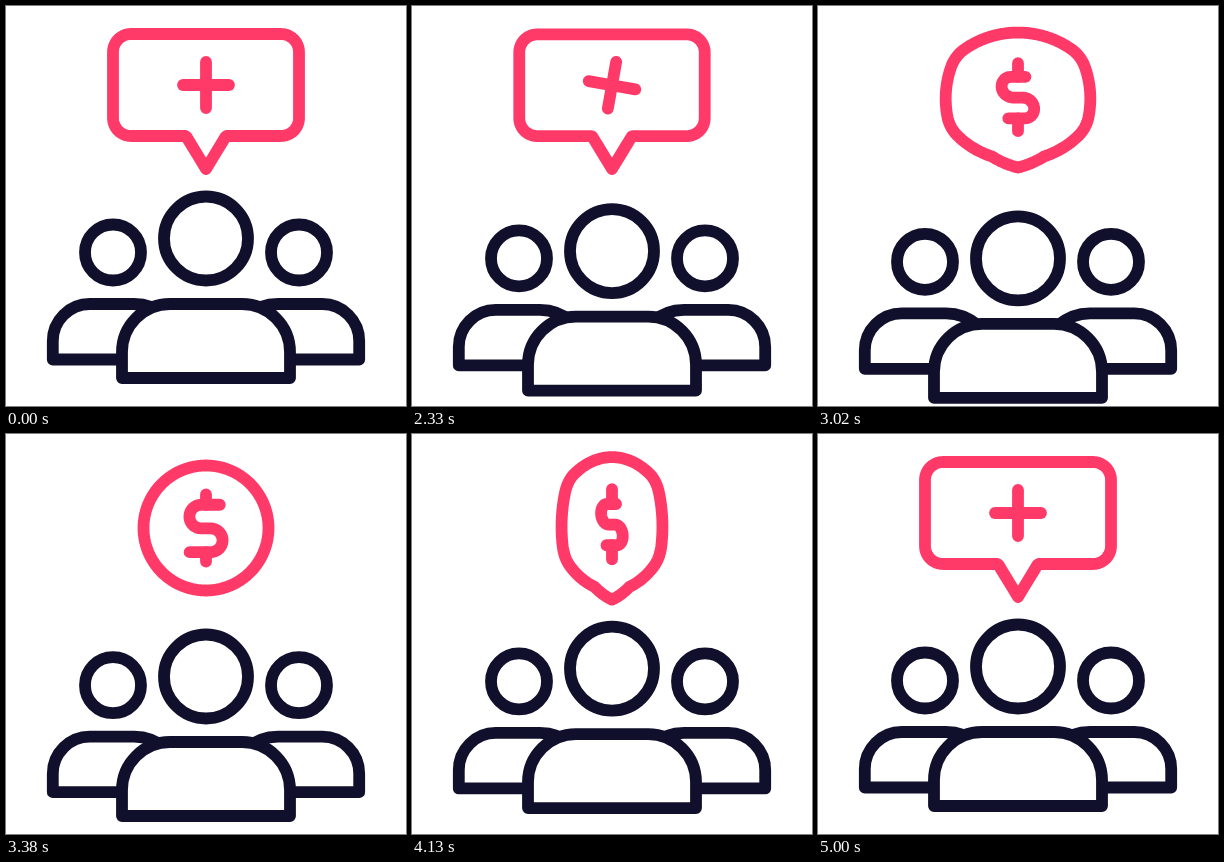
Animation of 400x400 px, one loop 5.03 s. Source, as an HTML page:

```html
<!DOCTYPE html>
<html lang="en">
<head>
<meta charset="utf-8">
<title>Group health costs</title>
<style>
  html, body { margin: 0; width: 100%; height: 100%; overflow: hidden; background: #fff; }
  svg { display: block; width: 100vw; height: 100vh; }
  path, circle { fill: none; stroke-width: 11.8; stroke-linecap: round; stroke-linejoin: round; }
  .people { stroke: #10102c; }
  .people .front { fill: #fff; }
  .icon { stroke: #ff3a69; }
</style>
</head>
<body>
<svg viewBox="0 0 400 400">
  <defs>
    <g id="person">
      <circle cx="107" cy="246.5" r="28"/>
      <path d="M116 353.5H46.8V335A37 37 0 0 1 83.8 298H128Q146 298 160 310"/>
    </g>
  </defs>
  <g class="people">
    <g id="sides">
      <use href="#person"/>
      <use href="#person" transform="translate(400) scale(-1 1)"/>
    </g>
    <g id="middle">
      <circle cx="200" cy="232.5" r="42"/>
      <path class="front" d="M116 372V346A48 48 0 0 1 164 298H236A48 48 0 0 1 284 346V372Z"/>
    </g>
  </g>
  <g class="icon">
    <path id="outline"/>
    <path id="bar"/>
    <path id="stems"/>
  </g>
</svg>
<script>
const LOOP = 5030, HOLD = 2030, STEP = 30;
const TIP = 163, PLUS_Y = 79, COIN_Y = 94;
const $ = id => document.getElementById(id);

// [time, value] keys, joined by smooth curves
const keys = {
  drop: [[2030, 0], [2150, 3], [2340, 13], [2540, 20], [2800, 21], [2950, 20.5], [3110, 18.5],
         [3380, 10], [3650, 6], [3800, 4], [4190, 1.8], [4400, 1], [5000, 0]],
  bubble: [[2000, 1], [2030, .98], [2140, .93], [2540, 1.075], [2750, 1.065], [3200, 1]],
  glyph: [[2000, 1], [2030, .98], [2140, .93], [2540, 1.17], [2750, 1.2], [3200, 1]],
  turn: [[2000, 0], [2030, 2], [2300, 90], [2600, 180]],
  coin: [[2700, .9], [3110, .93], [3380, .862], [3650, 1], [3730, 1.01], [3800, 1]],
  morph: [[2600, 0], [2750, .17], [2980, .75], [3200, 1], [4040, 1], [4190, .5], [4330, 0]],
  width: [[3850, 1], [4100, .72], [4333, 0]]
};

function at(k, t) {
  const n = k.length - 1;
  if (t <= k[0][0]) return k[0][1];
  if (t >= k[n][0]) return k[n][1];
  const rate = i => (k[i + 1][1] - k[i][1]) / (k[i + 1][0] - k[i][0]);
  const slope = i => {
    if (i === 0 || i === n) return 0;
    const a = rate(i - 1), b = rate(i);
    return a * b <= 0 ? 0 : 2 * a * b / (a + b);
  };
  let i = 0;
  while (t >= k[i + 1][0]) i++;
  const h = k[i + 1][0] - k[i][0], u = (t - k[i][0]) / h, v = 1 - u;
  return v * v * (1 + 2 * u) * k[i][1] + u * u * (3 - 2 * u) * k[i + 1][1]
    + h * u * v * (v * slope(i) - u * slope(i + 1));
}

function sample(d, n) {
  const p = document.createElementNS('http://www.w3.org/2000/svg', 'path');
  p.setAttribute('d', d);
  const len = p.getTotalLength();
  return Array.from({ length: n + 1 }, (_, i) => {
    const q = p.getPointAtLength(len * i / n);
    return [q.x, q.y];
  });
}

const bubble = sample('M200 28H275A18 18 0 0 1 293 46V112A18 18 0 0 1 275 130H220L200 163' +
  'L180 130H125A18 18 0 0 1 107 112V46A18 18 0 0 1 125 28Z', 400);
const coin = bubble.map((_, i) => {
  const a = i / 400 * 2 * Math.PI;
  return [200 + 72.5 * Math.sin(a), COIN_Y - 72.5 * Math.cos(a)];
});
const dash = sample('M177 79H223', 60);
const ess = sample('M216 67H194.5A13.75 13.75 0 0 0 194.5 94.5H205.5A13.75 13.75 0 0 1 205.5 122H181', 60);
const plusStems = [[200, 56], [200, 79], [200, 79], [200, 102]];
const coinStems = [[200, 55], [200, 67], [200, 122], [200, 133]];

const line = pts => 'M' + pts.map(p => p[0].toFixed(2) + ' ' + p[1].toFixed(2)).join('L');

function draw(t) {
  const v = {};
  for (const name in keys) v[name] = at(keys[name], t);
  if (t > 4333) v.width = Math.sin(Math.min(1, (t - 4333) / 500) * Math.PI / 2);
  if (t >= 2600) v.turn = 0;

  $('middle').setAttribute('transform', `translate(0 ${v.drop})`);
  $('sides').setAttribute('transform', `translate(0 ${v.drop * .47})`);

  const a = v.turn * Math.PI / 180, cos = Math.cos(a), sin = Math.sin(a);
  const plusY = PLUS_Y + Math.max(0, 1 - v.bubble) * (TIP - PLUS_Y);
  const scaled = ([x, y], s, from, to = from) => [200 + (x - 200) * s, to + (y - from) * s];
  const mix = (p, q) => [
    200 + (p[0] + (q[0] - p[0]) * v.morph - 200) * v.width,
    p[1] + (q[1] - p[1]) * v.morph
  ];
  const inCoin = p => scaled(p, v.coin, COIN_Y);
  const inPlus = ([x, y]) => {
    const dx = x - 200, dy = y - PLUS_Y;
    return scaled([200 + dx * cos - dy * sin, PLUS_Y + dx * sin + dy * cos], v.glyph, PLUS_Y, plusY);
  };
  const glyph = (from, to) => from.map((p, i) => mix(inPlus(p), inCoin(to[i])));

  $('outline').setAttribute('d',
    line(bubble.map((p, i) => mix(scaled(p, v.bubble, TIP), inCoin(coin[i])))) + 'Z');
  $('bar').setAttribute('d', line(glyph(dash, ess)));
  const stems = glyph(plusStems, coinStems);
  $('stems').setAttribute('d', line(stems.slice(0, 2)) + line(stems.slice(2)));
}

const start = performance.now();
function tick() {
  const t = (performance.now() - start) % LOOP;
  draw(t < HOLD ? 0 : HOLD + Math.floor((t - HOLD) / STEP) * STEP);
  requestAnimationFrame(tick);
}
tick();
</script>
</body>
</html>
```
